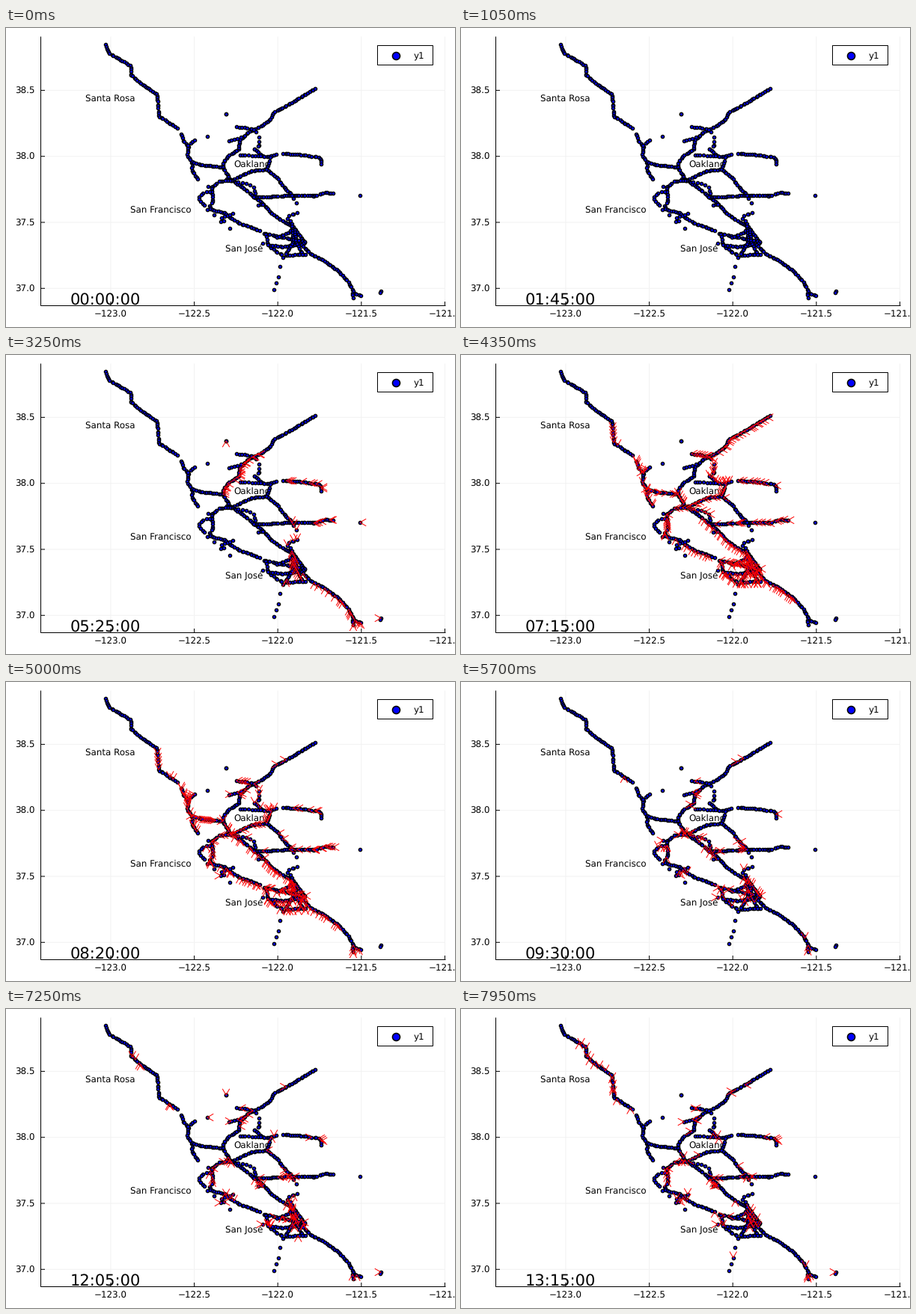
Animation, 600 px wide and 400 px high, one loop 8 s. Source, as a matplotlib script:

```python
import math

import matplotlib.pyplot as plt
import numpy as np
from matplotlib.animation import FuncAnimation
from matplotlib.collections import LineCollection

W, H, DPI = 600, 400, 100
FRAMES, INTERVAL = 160, 50
PX = 72 / DPI  # points per pixel
LEFT, RIGHT, TOP, BOTTOM = 46.5, 586.5, 12, 371.5
LEG, SPREAD = 9.5, math.radians(30)
EAST, NORTH, WEST, SOUTH = np.arange(4) * math.pi / 2

plt.rcParams.update({"font.family": "DejaVu Sans", "text.hinting": "none"})
rng = np.random.default_rng(7)
sensors = []  # x, y, rush heading, rush start, rush end, rush share
lone_jams = []  # x, y, heading, start, end


def track(heading, *pts, start=6, end=8.8, share=.5, gap=2.8):
    """Sensors along a road, with the hours and density of its morning rush."""
    p = np.array(pts, float)
    dist = np.r_[0, np.cumsum(np.hypot(*np.diff(p, axis=0).T))]
    count = max(2, round(dist[-1] / gap) + 1)
    s = np.linspace(0, dist[-1], count)
    s[1:-1] += rng.uniform(-.4, .4, count - 2) * gap
    for d in s:
        x, y = np.interp(d, dist, p[:, 0]), np.interp(d, dist, p[:, 1])
        sensors.append((x, y, heading, start, end, share))


def lone(x, y, heading=EAST, *hours):
    """A single sensor, jammed between the given pairs of hours."""
    sensors.append((x, y, heading, 0, 0, 0))
    for start, end in zip(hours[::2], hours[1::2]):
        lone_jams.append((x, y, heading, start, end))


# North-west corridor
track(SOUTH, (133, 22), (138, 34), (147, 39), (167, 51), (167, 63), (180, 74), (201, 88),
      share=0)
track(SOUTH, (202, 91), (204, 118), (211, 122), (220, 128), (229, 134), share=.3)
track(SOUTH, (234, 142), (238, 153), (244, 158), (242, 170), (249, 182), (248, 190),
      (256, 202), share=.6)
track(EAST, (243, 157), (252, 150), gap=4, share=.7)
track(EAST, (249, 179), (260, 183), (290, 186), share=.6)
# North-east corridor
track(WEST, (290, 186), (290, 180), (296, 172), (311, 162), (312, 150), (324, 139),
      (341, 131), start=4.4, end=6.4, share=.7)
track(WEST, (343, 130), (354, 121), (358, 113), (380, 101), (413, 81), start=5.8, end=8.4)
track(WEST, (308, 132), (330, 135), (334, 139), gap=3.5, start=5.5, share=.8)
track(WEST, (298, 151), (314, 146), gap=4, share=.1)
track(SOUTH, (338, 146), (338, 157), (332, 162), gap=5, share=.9)
track(SOUTH, (332, 162), (341, 170), (347, 173), (361, 169), gap=3.2, share=.7)
track(WEST, (313, 170), (340, 171), gap=4, share=0)
track(SOUTH, (354, 171), (348, 189), gap=3, share=.8)
track(WEST, (370, 168), (390, 169), (418, 173), (421, 176), (421, 182), start=4.5, end=8.6)
# Central and eastern routes
track(SOUTH, (290, 186), (294, 194), (301, 204), share=.6)
track(WEST, (301, 204), (328, 191), (348, 189), share=.5)
track(WEST, (348, 189), (362, 200), (371, 212), (382, 224), share=.2)
track(NORTH, (295, 202), (303, 204), (324, 219), (331, 226), share=.25)
track(NORTH, (331, 226), (340, 232), (356, 249), (366, 256), (384, 266), (399, 287))
track(WEST, (310, 206), (322, 208), (331, 213), (333, 221), gap=5, share=.3)
track(WEST, (331, 226), (345, 226), (380, 224), (411, 224), share=.4)
track(WEST, (411, 225), (427, 220), (437, 221), start=4.4, share=.5)
track(WEST, (337, 237), (343, 236))
track(SOUTH, (382, 224), (388, 234), gap=5, start=4.5, end=6.5)
track(SOUTH, (389, 247), (378, 251), (376, 255), gap=4, start=4.5, end=7)
# Peninsula
track(WEST, (301, 204), (284, 205), (275, 213), share=.4)
track(NORTH, (275, 213), (276, 232), (272, 238), (274, 243), (292, 247), (303, 256),
      (312, 261), (339, 271))
track(NORTH, (275, 219), (265, 219), (257, 228), (265, 237), gap=4, share=0)
track(NORTH, (288, 254), (303, 248), gap=4, share=.2)
# South Bay
track(WEST, (345, 275), (365, 279), (399, 286), share=.6)
track(NORTH, (347, 276), (350, 290), (362, 300), (370, 304), (400, 303), gap=3.4, share=.8)
track(NORTH, (362, 280), (380, 273), (382, 265), (380, 258), gap=3.2, share=.5)
track(NORTH, (350, 290), (370, 293), (398, 288), gap=3.2, share=.7)
track(NORTH, (382, 262), (384, 285), (374, 302), gap=3, start=5, share=.6)
track(NORTH, (374, 302), (365, 314), (367, 323), (358, 350), gap=10, share=0)
track(NORTH, (386, 270), (387, 285), (396, 303), gap=3, start=5, share=.7)
track(NORTH, (399, 286), (395, 290), (408, 303), (425, 311), (444, 325), start=5.2, share=.6)
track(NORTH, (446, 327), (458, 340), (465, 354), (474, 358), start=4.3, end=7.2, share=.7)
track(NORTH, (463, 355), (464, 361), start=4.5, share=.5)
# Single sensors
lone(294, 115, SOUTH, 2, 2.4, 11.6, 12.7)
lone(294, 115, NORTH, 4.5, 6)
lone(473, 224, WEST, 4.3, 6.2)
lone(269, 145, WEST, 11.5, 12.7)
lone(501, 352, EAST, 4.3, 6.2, 11.4, 15)
for spot in [(270, 212), (269, 243), (278, 250), (287, 259), (291, 258), (299, 268),
             (343, 288), (500, 354)]:
    lone(*spot)

# Places with slow traffic after the rush: x, y, first hour
HOT = [(367, 108, 8), (310, 148, 8), (420, 175, 8), (378, 218, 8), (338, 230, 8),
       (385, 262, 8), (386, 284, 8), (274, 222, 8), (301, 203, 8), (348, 285, 8),
       (292, 256, 8), (462, 355, 8), (220, 126, 8), (177, 71, 10.2), (350, 178, 10.2),
       (204, 105, 12.4), (166, 48, 12.7), (364, 330, 12.7)]
HOT_SIZE, HOT_SHARE = 12, .45

x, y, heading, start, end, share = np.array(sensors).T
phase = rng.uniform(0, 1, len(x))
drift = rng.uniform(-.03, .03, len(x))
back = rng.random(len(x)) < .5  # sensors on the opposite lanes


def ramp(hour, first, last, fade=.5):
    return np.clip(np.minimum(hour - first, last - hour) / fade, 0, 1)


def arrowhead(px, py, a):
    legs = [(px - LEG * math.cos(a + d), py + LEG * math.sin(a + d))
            for d in (-SPREAD, SPREAD)]
    return [legs[0], (px, py), legs[1]]


def arrows(frame):
    """Open arrowheads for the sensors that report slow traffic."""
    hour = frame / 12
    level = (phase + drift * frame) % 1
    rush = level < share * ramp(hour, start, end)
    heat = sum(np.exp(-((x - hx) ** 2 + (y - hy) ** 2) / HOT_SIZE ** 2) * ramp(hour, first, 99)
               for hx, hy, first in HOT)
    late = ~rush & (level < HOT_SHARE * heat)
    angle = heading + math.pi * (late & back)
    heads = [arrowhead(x[i], y[i], angle[i]) for i in np.flatnonzero(rush | late)]
    heads += [arrowhead(*jam[:3]) for jam in lone_jams if jam[3] < hour < jam[4]]
    return heads


fig = plt.figure(figsize=(W / DPI, H / DPI), dpi=DPI, facecolor="white")
ax = fig.add_axes([0, 0, 1, 1])
ax.set(xlim=(0, W), ylim=(H, 0))
ax.axis("off")


def line(xs, ys, color="black", z=2):
    ax.plot(xs, ys, color=color, lw=PX, zorder=z, snap=False)


def label(px, py, text, size=11.9, ha="left", z=3):
    return ax.text(px, py, text, fontsize=size * PX, ha=ha, va="baseline", zorder=z)


def dots(xs, ys, size, edge, z):
    ax.plot(xs, ys, "o", ms=size * PX, mfc="blue", mec="black", mew=edge * PX, zorder=z)


for k in range(5):
    tx = 139.9 + 111.65 * k
    line([tx, tx], [TOP, BOTTOM], "#f2f2f2", 1)
    line([tx, tx], [BOTTOM, BOTTOM - 5])
    label(tx, 386.5, f"\u2212{123 - k / 2:.1f}", ha="center")
for k in range(4):
    ty = 348.3 - 88.3 * k
    line([LEFT, RIGHT], [ty, ty], "#f2f2f2", 1)
    line([LEFT, LEFT + 5], [ty, ty])
    label(38.7, ty + 4.5, f"{37 + k / 2:.1f}", ha="right")
line([LEFT, LEFT, RIGHT + .5], [TOP, BOTTOM, BOTTOM])

label(106.5, 99, "Santa Rosa")
label(165.7, 247.3, "San Francisco")
label(304.7, 185.5, "Oakland")
label(292.9, 300, "San José")

dots(x, y, 4.2, 1.4, 4)
heads = LineCollection([], colors="red", linewidths=PX, zorder=5)
ax.add_collection(heads)

ax.add_patch(plt.Rectangle((496.5, 23.5), 74, 26, fc="white", ec="black", lw=PX,
                           zorder=6, snap=False))
dots([520.8], [36.7], 10, 1.6, 7)
label(544.3, 41, "y1", z=7)
clock = label(86, 369.3, "", 21, z=8)


def update(frame):
    heads.set_segments(arrows(frame))
    minutes = 5 * frame
    clock.set_text(f"{minutes // 60:02d}:{minutes % 60:02d}:00")
    return heads, clock


anim = FuncAnimation(fig, update, frames=FRAMES, interval=INTERVAL, repeat=True,
                     repeat_delay=0)
plt.show()
```
